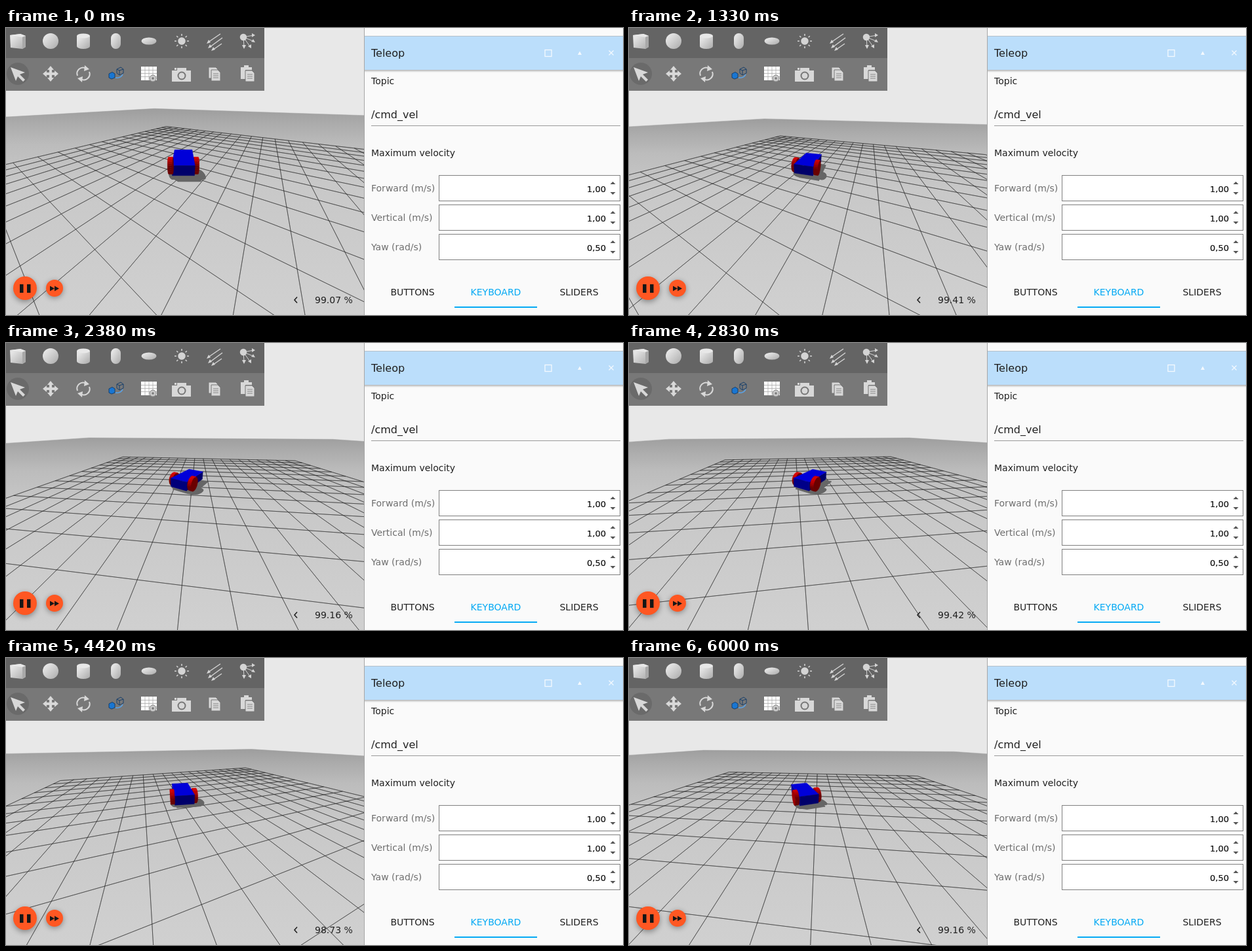
An HTML page with a canvas for the animation above (6040 ms loop, 941 by 439 pixels).

```html
<!DOCTYPE html>
<html lang="en">
<head>
<meta charset="utf-8">
<title>Teleop</title>
<style>
  html, body { margin: 0; width: 100%; height: 100%; overflow: hidden; background: #fafafa; }
  canvas, svg { position: absolute; left: 0; top: 0; }
  text { font: 14px "DejaVu Sans", sans-serif; fill: #212121; }
  .big { font-size: 16px; }
  .num { font-size: 13px; fill: #111; stroke: #111; stroke-width: .15; text-anchor: end; }
  .dim { fill: #6e6e6e; }
  .tab { text-anchor: middle; }
</style>
</head>
<body>
<canvas id="view" width="546" height="439"></canvas>
<svg width="941" height="439" viewBox="0 0 941 439">
  <defs>
    <linearGradient id="shade" x2="1" y2="1"><stop offset=".2" stop-color="#e4e4e4"/><stop offset="1" stop-color="#aaa"/></linearGradient>
    <linearGradient id="fade" x2="0" y2="1"><stop stop-color="#000" stop-opacity=".28"/><stop offset="1" stop-color="#000" stop-opacity="0"/></linearGradient>
    <filter id="soft" x="-50%" y="-50%" width="200%" height="200%"><feGaussianBlur stdDeviation="4"/></filter>
  </defs>

  <!-- toolbar -->
  <rect width="394" height="46" fill="#646464"/>
  <rect y="46" width="394" height="50" fill="#787878"/>
  <g fill="url(#shade)">
    <path d="M6 11 22 9 30 12V29L25 32 7 30Z"/>
    <circle cx="68" cy="20" r="12"/>
    <path d="M108 12V28A10 4 0 0 0 128 28V12Z"/>
    <rect x="160" y="8" width="15" height="24" rx="7.5"/>
    <ellipse cx="218" cy="20" rx="11.5" ry="5.5"/>
  </g>
  <path d="M6 11 22 9 30 12 25 14Z" fill="#e8e8e8"/>
  <path d="M25 14 30 12V29L25 32Z" fill="#a8a8a8"/>
  <ellipse cx="118" cy="12" rx="10" ry="3.5" fill="#e8e8e8"/>
  <g fill="#d4d4d4" stroke="#d4d4d4" stroke-width="1.5">
    <circle cx="268" cy="20" r="5"/>
    <path id="rays" fill="none"/>
    <path d="M327 9 308 22M330 15 311 29M329 24 316 33" fill="none"/>
    <path d="M306 24 309 18 312 22ZM308 31 311 25 314 29ZM313 35 316 29 319 33Z" stroke="none"/>
    <circle cx="362" cy="14" r="4.5"/>
    <path d="M362 14 378 11M362 14 377 20M362 14 372 28M362 14 363 28" fill="none" stroke-width="1"/>
    <path d="M380 11 375 8V14ZM380 22 374 21 377 17ZM374 31 369 28 374 25ZM363 32 360 26H366Z" stroke="none"/>
  </g>
  <circle cx="18" cy="70" r="17" fill="#6a6a6a"/>
  <g fill="#d8d8d8">
    <path d="M7 60 29 68 21 71 29 79 26 82 18 74 15 81Z"/>
    <path d="M68 58 73 64H70V68H74V65L80 70 74 75V72H70V76H73L68 82 63 76H66V72H62V75L56 70 62 65V68H66V64H63Z"/>
    <path d="M109 73A9 9 0 0 1 122 62M127 67A9 9 0 0 1 114 78" fill="none" stroke="#d8d8d8" stroke-width="2"/>
    <path d="M120 57 127 63 119 66ZM116 83 109 77 117 74Z"/>
    <rect x="206" y="59" width="24" height="21" fill="#fff"/>
    <path d="M206 64.500H230M206 69.500H230M206 74.500H230M212 59V80M218 59V80M224 59V80" stroke="#aaa" stroke-width=".8"/>
    <circle cx="224" cy="77" r="5" fill="#c9c9c9" stroke="#888"/><circle cx="224" cy="77" r="1.700" fill="#777"/>
    <path d="M253 65H261V61H275V65H282V82H253Z"/>
    <circle cx="268" cy="73" r="6.500" fill="#777"/><circle cx="268" cy="73" r="4.500"/>
    <path d="M257 61H260V64H257Z"/>
    <path d="M309 60H320L323 63V77H309Z" stroke="#777"/>
    <path d="M313 64H323L327 68V81H313Z" stroke="#777"/>
    <path d="M316 70H324M316 73H324M316 76H324" stroke="#888"/>
    <path d="M358 60H375V64H365V78H358Z"/><rect x="363" y="57" width="7" height="4"/>
    <path d="M365 65H375L379 69V82H365Z" stroke="#777"/>
    <path d="M368 71H376M368 74H376M368 77H376" stroke="#888"/>
  </g>
  <g stroke="#173f6b">
    <path d="M157 70 162 67.500 166 70V76L161 78 157 76Z" fill="#1976d2"/>
    <path d="M169 63 175 60 179 63V69L173 72 169 69ZM169 63 173 65 179 63M173 65V72" fill="none"/>
    <path d="M167 76Q175 77 178 71" fill="none" stroke="#58a6ef" stroke-width="1.500"/>
  </g>

  <!-- playback -->
  <g fill="#000" opacity=".35" filter="url(#soft)"><circle cx="29" cy="401" r="18"/><circle cx="74" cy="400" r="13"/></g>
  <circle cx="29" cy="398" r="18" fill="#ff5722"/>
  <circle cx="74" cy="398" r="13" fill="#ff5722"/>
  <path d="M21 392H26.500V405H21ZM32 392H37.500V405H32ZM67 394.500 74 398.500 67 402.500ZM74 394.500 81 398.500 74 402.500Z" fill="#161616"/>
  <path d="M444 411.500 440 416 444 420.500" fill="none" stroke="#222" stroke-width="1.600"/>
  <text id="rate" x="471" y="421"></text>

  <!-- side panel -->
  <rect x="546" width="395" height="439" fill="#fafafa"/>
  <path d="M546.500 0V439" stroke="#a6a6a6"/>
  <rect x="547" y="64" width="394" height="4" fill="url(#fade)"/>
  <rect x="547" y="12" width="394" height="52" fill="#bbdefb"/>
  <path d="M547 12.500H941" stroke="#b4c0ca"/>
  <text class="big" x="557" y="44">Teleop</text>
  <g fill="none" stroke="#f4f9fe" stroke-width="1.300">
    <rect x="822" y="33.500" width="10" height="10"/>
    <path d="M919.500 34.500 926.500 41.500M926.500 34.500 919.500 41.500"/>
    <path d="M872 41 875 35.500 878 41Z" fill="#f4f9fe" stroke="none"/>
  </g>
  <text x="557" y="86">Topic</text>
  <text class="big" x="557" y="138">/cmd_vel</text>
  <path d="M557 149.500H937" stroke="#999"/>
  <text x="557" y="196">Maximum velocity</text>
  <g id="fields"></g>
  <text class="tab" x="620" y="408.500">BUTTONS</text>
  <text class="tab" x="747" y="408.500" style="fill:#03a9f4">KEYBOARD</text>
  <text class="tab" x="874" y="408.500">SLIDERS</text>
  <rect x="684" y="426" width="126" height="2" fill="#03a9f4"/>
</svg>
<script>
const LOOP = 6040, STEPS = 145;
const FOCAL = 183, CX = 270.5, CY = 221.5, HEIGHT = 3;
const LIGHT = [.097, .483, .87];
const rad = a => a * Math.PI / 180;
const $ = id => document.getElementById(id);
const g = $('view').getContext('2d');

// time (s), camera x, y, heading (deg), distance to robot, robot heading relative to camera (deg)
const KEYS = [
  [0, -4.2, -1.57, 31.5, 5.08, 0],
  [.67, -4.33, -1.45, 30.2, 5.38, -3],
  [1.33, -4.45, -1.07, 25.5, 5.96, -18],
  [1.88, -4.25, -.6, 18.4, 6.22, -26],
  [2.83, -4.4, 2.1, -5.3, 6.27, -34],
  [3.58, -3.2, 2.88, -17.2, 6.29, -11],
  [4.4, -3.1, 2.75, -17.5, 5.96, 8],
  [5.13, -2.9, 1.75, -7.3, 6.37, 23],
  [6, -2.9, 0, 5.2, 5.96, 18]
];
const RATES = [[0, '99.07'], [.9, '99.41'], [1.6, '99.16'], [2.4, '99.42'], [3.2, '98.39'], [4.3, '98.73'], [5.6, '99.16']];

function slope(i, c) {
  const a = KEYS[Math.max(i - 1, 0)], b = KEYS[Math.min(i + 1, KEYS.length - 1)];
  return (b[c] - a[c]) / (b[0] - a[0]);
}

// cubic Hermite through the keys
function pose(t) {
  let i = 0;
  while (i < KEYS.length - 2 && t >= KEYS[i + 1][0]) i++;
  const a = KEYS[i], b = KEYS[i + 1], d = b[0] - a[0], u = Math.min((t - a[0]) / d, 1), v = 1 - u;
  return [1, 2, 3, 4, 5].map(c =>
    v * v * (1 + 2 * u) * a[c] + u * u * (3 - 2 * u) * b[c] +
    u * v * d * (v * slope(i, c) - u * slope(i + 1, c)));
}

// convex outline in x-z, extruded along y; returns faces with outward normals
function prism(outline, y0, y1, paint) {
  const faces = [
    { n: [0, 1, 0], pts: outline.map(([x, z]) => [x, y1, z]) },
    { n: [0, -1, 0], pts: outline.map(([x, z]) => [x, y0, z]) }
  ];
  outline.forEach(([x, z], i) => {
    const [p, q] = outline[(i + 1) % outline.length], len = Math.hypot(p - x, q - z);
    faces.push({ n: [(q - z) / len, 0, (x - p) / len], pts: [[x, y0, z], [p, y0, q], [p, y1, q], [x, y1, z]] });
  });
  return { faces, paint };
}

const red = s => `rgb(${s},0,0)`, blue = s => `rgb(0,0,${s})`;
const rim = Array.from({ length: 28 }, (_, i) => [.4 * Math.cos(rad(i * 360 / 28)), .4 + .4 * Math.sin(rad(i * 360 / 28))]);
const body = prism([[-.5, .15], [1.5, .15], [1.5, .65], [-.5, .65]], -.5, .5, blue);
const leftWheel = prism(rim, .5, .7, red), rightWheel = prism(rim, -.7, -.5, red);

function draw(t) {
  const [camX, camY, headingDeg, dist, relDeg] = pose(t);
  const heading = rad(headingDeg), pitch = Math.atan(HEIGHT / dist);
  const ch = Math.cos(heading), sh = Math.sin(heading), cp = Math.cos(pitch), sp = Math.sin(pitch);
  const turn = heading + rad(relDeg), ct = Math.cos(turn), st = Math.sin(turn);
  const botX = camX + dist * ch, botY = camY + dist * sh;

  const toCamera = ([x, y, z]) => {
    const dx = x - camX, dy = y - camY, f = dx * ch + dy * sh, down = HEIGHT - z;
    return [dx * sh - dy * ch, down * cp - f * sp, f * cp + down * sp];
  };
  const spin = ([x, y, z]) => [x * ct - y * st, x * st + y * ct, z];
  const place = p => { const [x, y, z] = spin(p); return [x + botX, y + botY, z]; };
  const toGround = ([x, y, z]) => [x - z * LIGHT[0] / LIGHT[2], y - z * LIGHT[1] / LIGHT[2], 0];

  // traces a shape, cut at the near plane
  function trace(points) {
    const near = .05, cam = points.map(toCamera), out = [];
    cam.forEach((a, i) => {
      const b = cam[(i + 1) % cam.length];
      if (a[2] >= near) out.push(a);
      if ((a[2] >= near) !== (b[2] >= near)) {
        const k = (near - a[2]) / (b[2] - a[2]);
        out.push(a.map((v, j) => v + (b[j] - v) * k));
      }
    });
    g.beginPath();
    out.forEach(([x, y, z]) => g.lineTo(CX + FOCAL * x / z, CY + FOCAL * y / z));
    g.closePath();
  }
  function fill(points, colour) {
    trace(points);
    g.fillStyle = g.strokeStyle = colour;
    g.lineWidth = .5;
    g.fill();
    g.stroke();
  }

  g.fillStyle = '#e8e8e8';
  g.fillRect(0, 0, 546, 439);

  const horizon = CY - FOCAL * HEIGHT / dist;
  const ground = g.createLinearGradient(0, horizon + 8, 0, 439);
  [[0, '#9c9c9c'], [.07, '#aaa'], [.18, '#bcbcbc'], [.36, '#c8c8c8'], [1, '#d0d0d0']].forEach(s => ground.addColorStop(...s));
  fill([[50, 50, 0], [50, -50, 0], [-50, -50, 0], [-50, 50, 0]], ground);

  g.strokeStyle = 'rgba(40,40,40,.62)';
  g.lineWidth = .8;
  for (let i = -10; i <= 10; i++) {
    for (const line of [[[i, -10, 0], [i, 10, 0]], [[-10, i, 0], [10, i, 0]]]) {
      trace(line);
      g.stroke();
    }
  }

  const solids = relDeg < 0 ? [leftWheel, body, rightWheel] : [rightWheel, body, leftWheel];
  for (const s of solids) for (const f of s.faces) fill(f.pts.map(p => toGround(place(p))), '#666');
  for (const s of solids) for (const f of s.faces) {
    const n = spin(f.n), pts = f.pts.map(place), [x, y, z] = pts[0];
    if (n[0] * (camX - x) + n[1] * (camY - y) + n[2] * (HEIGHT - z) <= 0) continue;
    const lit = Math.max(0, n[0] * LIGHT[0] + n[1] * LIGHT[1] + n[2] * LIGHT[2]);
    fill(pts, s.paint(Math.round(106 + 128 * lit)));
  }

  $('rate').textContent = RATES.filter(r => r[0] <= t).pop()[1] + ' %';
}

$('rays').setAttribute('d', Array.from({ length: 8 }, (_, i) => {
  const c = Math.cos(i * Math.PI / 4), s = Math.sin(i * Math.PI / 4);
  return `M${268 + 8 * c} ${20 + 8 * s}L${268 + 11 * c} ${20 + 11 * s}`;
}).join(''));

$('fields').innerHTML = [['Forward (m/s)', '1,00'], ['Vertical (m/s)', '1,00'], ['Yaw (rad/s)', '0,50']].map(([label, value], i) => {
  const y = 225 + 45 * i;
  return `<text class="dim" x="557" y="${y + 25}">${label}</text>
    <rect x="660.5" y="${y + .5}" width="276" height="39" fill="#fff" stroke="#808080"/>
    <text class="num" x="915" y="${y + 26}">${value}</text>
    <path d="M921.500 ${y + 14}H929.500L925.500 ${y + 10}ZM921.500 ${y + 26}H929.500L925.500 ${y + 30}Z" fill="#555"/>`;
}).join('');

const start = performance.now();
function tick() {
  const ms = (performance.now() - start) % LOOP;
  const step = Math.min(STEPS - 1, Math.floor(ms / LOOP * STEPS + .2));
  draw(step * LOOP / STEPS / 1000);
  requestAnimationFrame(tick);
}
tick();
</script>
</body>
</html>
```
